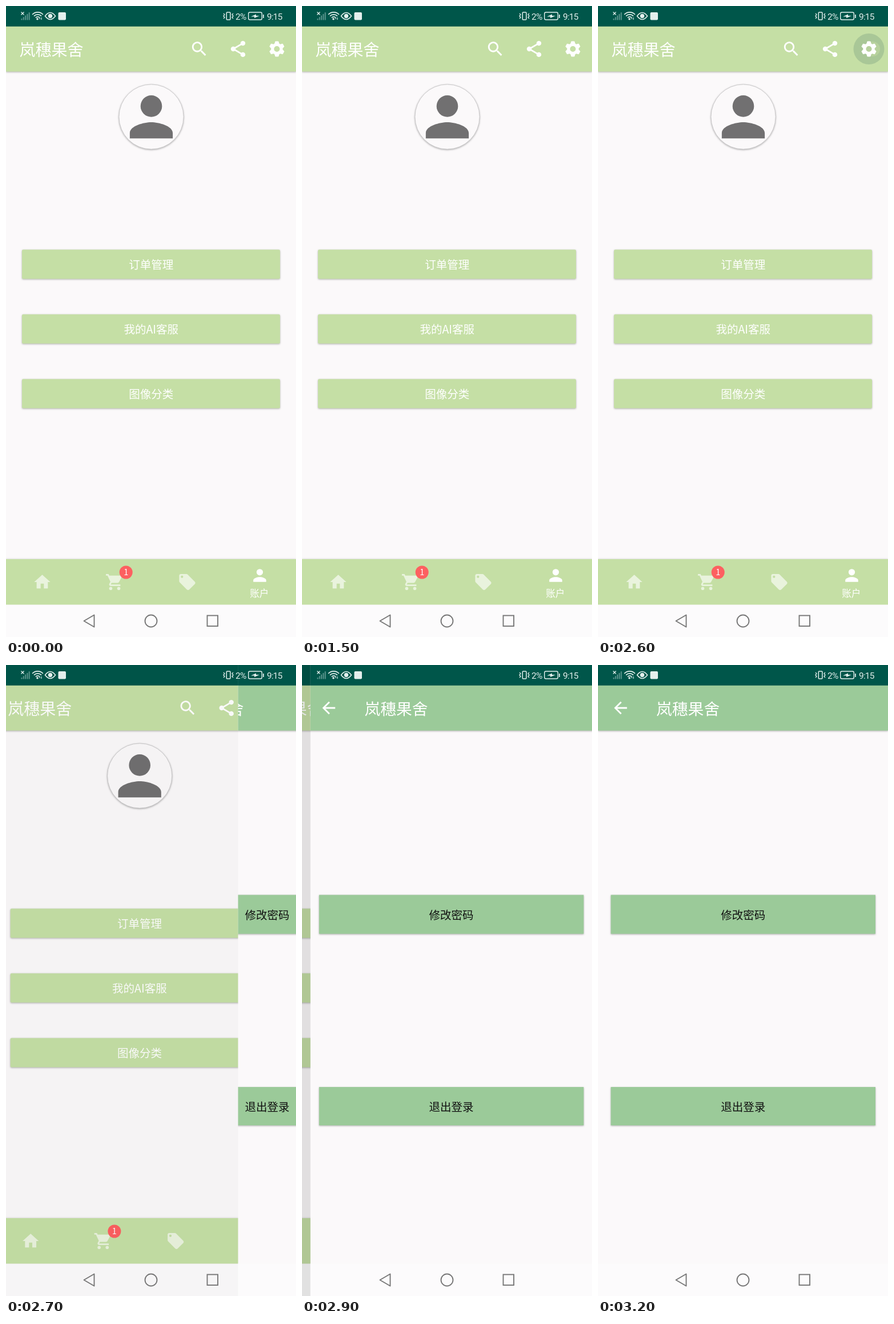
Animation, 508 px wide and 1102 px high, one loop 4 s. Source, as an HTML page:

```html
<!DOCTYPE html>
<html lang="zh">
<head>
<meta charset="utf-8">
<title>Account screen</title>
<style>
html, body { margin: 0; width: 100%; height: 100%; overflow: hidden; background: #fbf9fa; }
svg { display: block; width: 100%; height: 100%; }
text { font-family: 'Noto Sans CJK SC', 'Noto Sans CJK', 'Noto Sans', sans-serif; }
.num { font-family: Roboto, sans-serif; letter-spacing: -.8px; }
.raised { filter: drop-shadow(0 1px 1.5px rgba(0,0,0,.3)); }
</style>
</head>
<body>
<svg id="stage" viewBox="0 0 508 1102"></svg>
<script>
const LOOP = 4000, STEP = 100, W = 508;
const LIME = '#c5dfa5', GREEN = '#9bca99', TEAL = '#00564a', PAPER = '#fbf9fa';
const DP = W / 360;

const ICONS = {
  home: 'M10 20v-6h4v6h5v-8h3L12 3 2 12h3v8z',
  cart: 'M7 18a2 2 0 1 0 0 4 2 2 0 0 0 0-4zM1 2v2h2l3.6 7.59-1.35 2.45c-.16.28-.25.61-.25.96 0 1.1.9 2 2 2h12v-2H7.42c-.14 0-.25-.11-.25-.25l.03-.12.9-1.63h7.45c.75 0 1.41-.41 1.75-1.03l3.58-6.49A1 1 0 0 0 20 4H5.21l-.94-2H1zm16 16a2 2 0 1 0 0 4 2 2 0 0 0 0-4z',
  tag: 'M21.41 11.58l-9-9C12.05 2.22 11.55 2 11 2H4c-1.1 0-2 .9-2 2v7c0 .55.22 1.05.59 1.42l9 9c.8.78 2.04.78 2.82 0l7-7c.78-.8.78-2.04 0-2.84zM5.5 7a1.5 1.5 0 1 1 0-3 1.5 1.5 0 0 1 0 3z',
  person: 'M12 12a4 4 0 1 0 0-8 4 4 0 0 0 0 8zm0 2c-2.67 0-8 1.34-8 4v2h16v-2c0-2.66-5.33-4-8-4z',
  search: 'M15.5 14h-.79l-.28-.27A6.5 6.5 0 1 0 13.73 14.43l.27.28v.79l5 4.99L20.49 19zM9.5 14a4.5 4.5 0 1 1 0-9 4.5 4.5 0 0 1 0 9z',
  back: 'M20 11H7.83l5.59-5.59L12 4l-8 8 8 8 1.41-1.41L7.83 13H20z'
};

const rect = (x, y, w, h, fill, extra = '') =>
  `<rect x="${x}" y="${y}" width="${w}" height="${h}" fill="${fill}" ${extra}/>`;
const disc = (x, y, r, fill, extra = '') =>
  `<circle cx="${x}" cy="${y}" r="${r}" fill="${fill}" ${extra}/>`;
const line = (d, color, width, extra = '') =>
  `<path d="${d}" fill="none" stroke="${color}" stroke-width="${width}" ${extra}/>`;
const label = (s, x, cy, size, fill, anchor = 'middle', extra = '') =>
  `<text x="${x}" y="${cy + size * .37}" font-size="${size}" fill="${fill}" text-anchor="${anchor}" ${extra}>${s}</text>`;
const place = (body, x, y, k = DP, fill = '#fff', extra = '') =>
  `<g transform="translate(${x} ${y}) scale(${k}) translate(-12 -12)" fill="${fill}" ${extra}>${body}</g>`;
const icon = (name, ...at) => place(`<path d="${ICONS[name]}"/>`, ...at);

function gear(x, y) {
  let teeth = '';
  for (let a = 0; a < 360; a += 60)
    teeth += `<path d="M9.2 6.2L10.2 2.8h3.6l1 3.4z" stroke="#fff" stroke-width=".7" stroke-linejoin="round" transform="rotate(${a} 12 12)"/>`;
  return place(disc(12, 12, 5.4, 'none', 'stroke="#fff" stroke-width="3.6"') + teeth, x, y);
}

function share(x, y) {
  const dots = [[18, 5], [6, 12], [18, 19]].map(([a, b]) => disc(a, b, 3, '#fff')).join('');
  return place(line('M18 5L6 12l12 7', '#fff', 2) + dots, x, y);
}

const appBar = fill =>
  rect(0, 0, W, 36, TEAL) + rect(0, 35.5, W, 79, fill, 'class="raised"') + rect(0, 0, W, 35.5, TEAL);

function accountPage() {
  const buttons = ['订单管理', '我的AI客服', '图像分类'].map((s, i) => {
    const y = 425.5 + i * 113;
    return rect(28, y, 452, 51, LIME, 'rx="2" class="raised"') + label(s, 254.2, y + 26.5, 19.5, '#fff');
  }).join('');
  const tabs = ['home', 'cart', 'tag'].map((n, i) =>
    icon(n, 63.5 + i * 127, 1006, DP, '#fff', 'opacity=".62"')).join('');
  return appBar(LIME)
    + label('岚穗果舍', 23.5, 76.5, 28, '#fff', 'start', 'font-weight="500"')
    + icon('search', 338.5, 75) + share(406.5, 75)
    + '<g id="ripple">' + disc(474.5, 75, 27, '#a9c797') + disc(481, 75, 13, '#bdd6a0', 'opacity=".7"') + '</g>'
    + gear(474.5, 75)
    + disc(254.5, 193.5, 56.6, PAPER, 'stroke="#c6c5c6" stroke-width=".9" class="raised"')
    + icon('person', 254.5, 193.7, 80 * DP / 24, '#717071')
    + buttons
    + rect(0, 966, W, 79.5, LIME, 'style="filter:drop-shadow(0 -1px 1px rgba(0,0,0,.1))"')
    + tabs
    + disc(210.2, 989, 11.5, '#fd6060') + label('1', 210.2, 989, 14.5, '#fff')
    + icon('person', 444.5, 994.5) + label('账户', 443.8, 1025.5, 16.6, '#fff');
}

function settingsPage() {
  const row = (s, y, h) =>
    rect(22.5, y, 463.5, h, GREEN, 'class="raised"') + label(s, 254.2, y + 35, 19.5, '#111');
  return appBar(GREEN) + icon('back', 39.5, 75)
    + label('岚穗果舍', 102, 76.5, 27.8, '#fff', 'start')
    + row('修改密码', 401.5, 68) + row('退出登录', 737, 67);
}

function statusIcons() {
  const c = '#e4efed';
  let bars = '';
  for (let i = 0; i < 5; i++)
    bars += rect(26.5 + i * 3.3, 22 - i * 2.7, 2, 2.5 + i * 2.7, c, 'opacity=".4"');
  const arc = r => `M${55.5 - r * .72} ${24 - r * .7}A${r} ${r} 0 0 1 ${55.5 + r * .72} ${24 - r * .7}`;
  return bars + line('M26.5 10.5l5 5m0-5l-5 5', c, 1.4)
    + line(arc(13) + arc(9) + arc(5), c, 1.7) + disc(55, 22.8, 1.8, c)
    + line('M59 23v-3m3 0v4', c, 1.1)
    + line('M68.5 17.5q9-12 18 0q-9 12-18 0z', c, 1.6) + disc(77.5, 17.5, 3.7, c)
    + rect(91.5, 11, 13.5, 13.5, c, 'rx="2"')
    + rect(386.3, 11, 6.6, 13, 'none', `rx="1" stroke="${c}" stroke-width="1.5"`)
    + line('M381 13l2 2-2 2.500 2 2.500-2 2M398 13l-2 2 2 2.500-2 2.500 2 2', c, 1.3)
    + label('2%', 402, 18, 15.5, c, 'start', 'class="num"')
    + rect(424.700, 11, 23.600, 13, 'none', `rx="2.500" stroke="${c}" stroke-width="1.4"`)
    + rect(450, 15, 1.800, 6, c)
    + `<path d="M429 18.500l9-4v2.500h6l-9 4v-2.500z" fill="${c}"/>`
    + label('9:15', 457, 18, 15.5, c, 'start', 'class="num"');
}

const navIcons = () =>
  line('M136.500 1074L154.500 1063.500v21z', '#777', 1.9, 'stroke-linejoin="round"')
  + disc(254, 1074, 10.500, 'none', 'stroke="#777" stroke-width="1.9"')
  + rect(352.500, 1064.500, 18.500, 18.500, 'none', 'stroke="#777" stroke-width="1.9"');

const backdrop = rect(0, 0, W, 1102, PAPER) + rect(0, 1045.5, W, 56.5, '#fcfbfc') + rect(0, 0, W, 35.5, TEAL);

document.getElementById('stage').innerHTML =
  `<defs><clipPath id="reveal"><rect id="window" y="0" width="${W}" height="1102"/></clipPath></defs>`
  + backdrop + `<g id="account">${accountPage()}</g>`
  + rect(0, 0, W, 1102, '#000', 'id="dim"')
  + `<g id="cover" clip-path="url(#reveal)">${backdrop}<g id="settings">${settingsPage()}</g></g>`
  + statusIcons() + navIcons();

const $ = id => document.getElementById(id);
const set = (id, name, value) => $(id).setAttribute(name, value);

// Left edge of the incoming page at each step from 2600 ms
const EDGES = [508, 406.5, 127.3, 14.8, 0];

function draw(ms) {
  const t = Math.floor(ms / STEP) * STEP;
  const i = Math.max(0, Math.min(EDGES.length - 1, (t - 2600) / STEP));
  const edge = EDGES[i], gone = W - edge;
  set('ripple', 'opacity', t < 2500 ? 0 : t < 2600 ? .5 : 1);
  set('account', 'transform', `translate(${-gone * .2} 0)`);
  set('dim', 'opacity', .11 * gone / W);
  set('window', 'x', edge);
  set('cover', 'visibility', gone ? 'visible' : 'hidden');
  set('settings', 'transform', `translate(${edge / 2} 0)`);
}

function tick() {
  draw(performance.now() % LOOP);
  requestAnimationFrame(tick);
}
tick();
</script>
</body>
</html>
```
